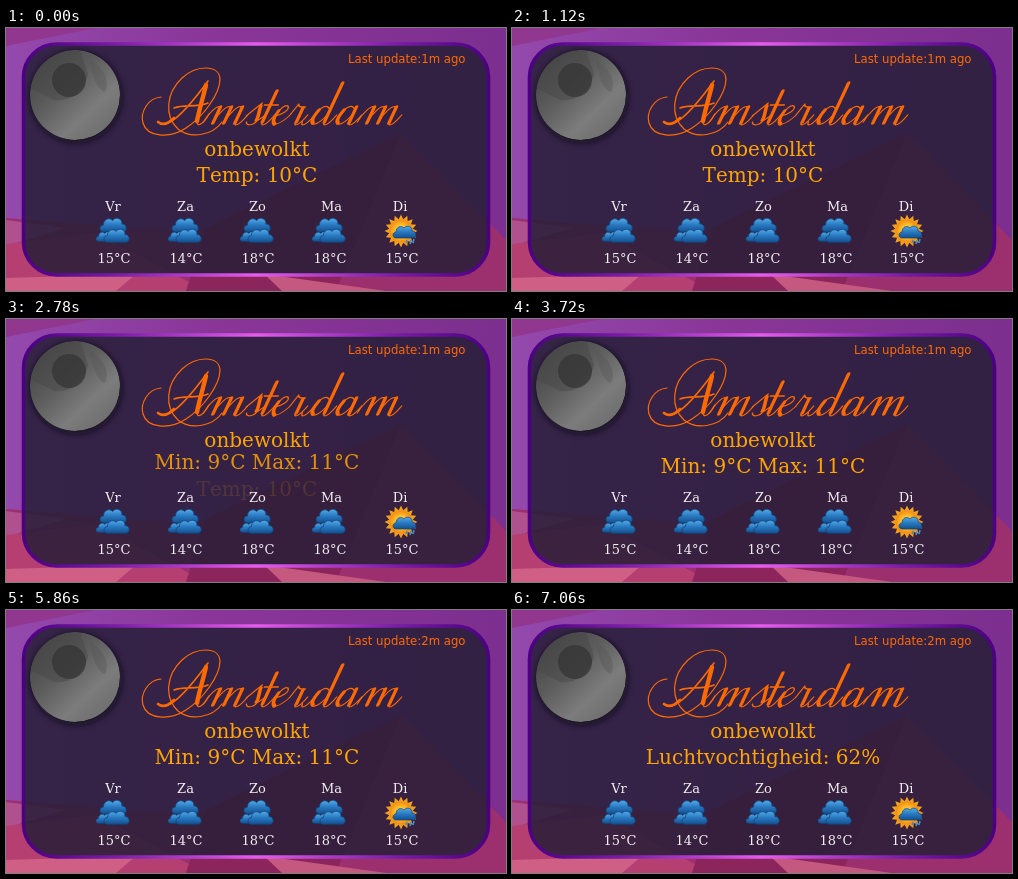
Animation of 500x263 px, one loop 8 s. Source, as an HTML page:

```html
<!DOCTYPE html>
<html lang="nl">
<head>
<meta charset="utf-8">
<title>Weer</title>
<style>
html, body { margin: 0; width: 100%; height: 100%; overflow: hidden; background: #6f3584; }
svg { display: block; width: 100vw; height: 100vh; }
text { font-family: "DejaVu Serif", serif; text-anchor: middle; font-kerning: none; }
.big { font-size: 20px; fill: #ffa500; }
.small { font-size: 13px; fill: #f4eef4; }
#update {
  font: 13px "DejaVu Sans Condensed", "DejaVu Sans", sans-serif;
  font-stretch: condensed; fill: #ff6a00; text-anchor: start;
}
.pen { fill: none; stroke: #ff6a00; stroke-linecap: round; stroke-linejoin: round; }
</style>
</head>
<body>
<svg viewBox="0 0 500 263" preserveAspectRatio="none">
  <defs>
    <linearGradient id="sky">
      <stop offset="0" stop-color="#9449ad"/><stop offset=".4" stop-color="#8a3699"/><stop offset="1" stop-color="#7c2f8e"/>
    </linearGradient>
    <linearGradient id="edge">
      <stop offset="0" stop-color="#4b0082"/><stop offset=".2" stop-color="#7a1da6"/>
      <stop offset=".5" stop-color="#e45cec"/>
      <stop offset=".8" stop-color="#7a1da6"/><stop offset="1" stop-color="#4b0082"/>
    </linearGradient>
    <linearGradient id="moonTone" x1=".15" y1=".1" x2=".85" y2=".85">
      <stop offset="0" stop-color="#464646"/><stop offset=".4" stop-color="#5e5e5e"/>
      <stop offset=".75" stop-color="#7c7c7c"/><stop offset="1" stop-color="#707070"/>
    </linearGradient>
    <linearGradient id="blue" x2="0" y2="1">
      <stop offset="0" stop-color="#55abe8"/><stop offset=".5" stop-color="#2878c0"/><stop offset="1" stop-color="#14508f"/>
    </linearGradient>
    <radialGradient id="sunTone">
      <stop offset="0" stop-color="#ffe36a"/><stop offset=".6" stop-color="#fdb827"/><stop offset="1" stop-color="#f28a12"/>
    </radialGradient>
    <filter id="soft" x="-30%" y="-30%" width="160%" height="160%"><feGaussianBlur stdDeviation="3"/></filter>
    <clipPath id="disc"><circle cx="69" cy="67" r="45"/></clipPath>
    <path id="puff" d="M3 13 C-1 13-1 7 3 7 C3 2 8 0 11 3 C14-1 20 2 19 6 C24 6 24 13 20 13 Z"
      fill="url(#blue)" stroke="#0f4479" stroke-width=".7"/>
    <g id="clouds">
      <use href="#puff" transform="translate(-13 -14) scale(1.15)"/>
      <use href="#puff" transform="translate(-17 0) scale(.8)"/>
      <use href="#puff" transform="translate(-9 -3) scale(1.1)"/>
    </g>
  </defs>

  <rect width="500" height="263" fill="url(#sky)"/>
  <path d="M0 0H90L0 18Z" fill="#92378f"/>
  <path d="M0 190L190 205 395 105 500 212V263H0Z" fill="#9c2f6e"/>
  <path d="M0 192L60 200 0 218Z" fill="#b0508f"/>
  <path d="M0 216L90 205 200 263H0Z" fill="#b63f72"/>
  <path d="M0 250L130 246 110 263H0Z" fill="#cf5f84"/>
  <path d="M180 263L200 200 395 105 330 263Z" fill="#8c255c"/>
  <path d="M258 246L380 263H276Z" fill="#c4587f"/>

  <rect x="17.5" y="16" width="465" height="231" rx="33" fill="#271f38" fill-opacity=".86"
    stroke="url(#edge)" stroke-width="3.6"/>

  <circle cx="70" cy="69" r="46" fill="#0c0912" opacity=".75" filter="url(#soft)"/>
  <g clip-path="url(#disc)">
    <circle cx="69" cy="67" r="45" fill="url(#moonTone)"/>
    <path d="M24 60C28 38 45 24 74 22L82 46C78 62 66 74 48 72Z" fill="#484848" opacity=".5"/>
    <circle cx="63" cy="52" r="17" fill="#343434" opacity=".75"/>
    <path d="M84 32C98 40 104 53 99 64C91 62 86 47 84 32Z" fill="#555" opacity=".4"/>
  </g>

  <text id="update" x="342" y="35"></text>

  <g class="pen" role="img" aria-label="Amsterdam">
    <path stroke-width="1.2" d="M155 69C142 70 134 84 137 95C141 109 163 111 180 100C197 89 214 66 214 51C213 36 190 37 176 50C160 65 158 88 172 101C184 111 206 108 216 94"/>
    <path stroke-width="1.6" d="M152 94C160 101 174 91 202 53M168 80C178 76 190 80 202 75"/>
    <path stroke-width="2.6" d="M152 94C157 98 163 95 168 90"/>
    <path stroke-width="4.4" d="M200 57C197 70 193 82 191 93"/>
    <path stroke-width="1.3" d="M191 94C191 99 197 97 203 86"/>
    <g transform="translate(0 97) skewX(-25)">
      <path id="thin" stroke-width="1.3"/>
      <path id="thick" stroke-width="3.5"/>
    </g>
  </g>

  <text class="big" x="251" y="128">onbewolkt</text>
  <text class="big" id="old" x="251"></text>
  <text class="big" id="new" x="251"></text>
  <g id="days"></g>
</svg>
<script>
const $ = id => document.getElementById(id);
const LOOP = 8000, SLIDE = 1000, LINE = 27;
const lines = ["Temp: 10°C", "Min: 9°C Max: 11°C", "Luchtvochtigheid: 62%"];
const starts = [1948, 5948];
// The widget repaints only at these moments.
const paints = [0, 2340, 2700, 3160, 4680, 6240, 6600, 7020];

// Script lettering, upright on the baseline; the group slants it.
const stem = x => `M${x} -18V-2`;
const arch = x => `M${x} -3C${x + 1} -12 ${x + 6} -20 ${x + 10} -18`;
const exit = x => `M${x} -3C${x} 2 ${x + 5} 1 ${x + 9} -10`;
const bowl = x => `M${x + 11} -17C${x + 5} -22 ${x} -14 ${x} -7C${x} 2 ${x + 7} 1 ${x + 12} -9`;
const bowlSide = x => `M${x + 2} -15C${x} -10 ${x - 1} -4 ${x + 2} -2`;
const emm = x => [arch(x - 10) + arch(x) + arch(x + 11) + exit(x + 22), stem(x) + stem(x + 11) + stem(x + 22)];
const letters = [
  emm(206),
  ["M236-9L246-22C244-18 248-12 249-7C250 0 241 2 239-3M249-4L255-10", "M246-19C246-14 249-10 248-5"],
  [exit(255) + "M249-20H263", "M255-34V-3"],
  ["M264-9C272-10 277-16 273-19C269-21 265-14 265-7C265 2 272 1 279-9", "M266-14C264-8 265-3 268-1"],
  ["M279-9L283-21C284-17 288-18 291-18" + exit(288), "M289-17V-3"],
  [exit(295) + bowl(304) + exit(317), bowlSide(304) + "M317-42V-3"],
  [bowl(329) + exit(342), bowlSide(329) + stem(342)],
  emm(360)
];
$("thin").setAttribute("d", letters.map(l => l[0]).join(""));
$("thick").setAttribute("d", letters.map(l => l[1]).join(""));

const sun = () => {
  const points = Array.from({ length: 32 }, (_, i) => {
    const a = i * Math.PI / 16, r = i % 2 ? 12 : 16.5;
    return `${(r * Math.cos(a)).toFixed(1)},${(r * Math.sin(a)).toFixed(1)}`;
  });
  return `<polygon points="${points.join(" ")}" fill="#f4a01c"/><circle r="11.5" fill="url(#sunTone)"/>
    <use href="#puff" x="-8" y="-6"/>
    <path d="M6 9l-1 3M10 9l-1 4M13 8l-1 4" stroke="#3f8fd0" stroke-width="1.6"/>`;
};

const days = [["Vr", 107, 15], ["Za", 179.5, 14], ["Zo", 251.5, 18], ["Ma", 325.5, 18], ["Di", 394, 15]];
$("days").innerHTML = days.map(([name, x, temp], i) => `
  <text class="small" x="${x}" y="183">${name}</text>
  <g transform="translate(${107 + 72 * i} 203)">${i < 4 ? '<use href="#clouds"/>' : sun()}</g>
  <text class="small" x="${108 + 72 * i}" y="235">${temp}°C</text>`).join("");

// Without a condensed face, use the matching smaller size.
$("update").textContent = "Last update:1m ago";
if ($("update").getComputedTextLength() > 123) $("update").style.fontSize = "11.6px";

const swing = p => (1 - Math.cos(Math.PI * Math.min(1, Math.max(0, p)))) / 2;

function place(el, text, y, opacity) {
  el.textContent = text;
  el.setAttribute("y", y);
  el.setAttribute("opacity", opacity);
}

function draw(time) {
  const t = paints.filter(p => p <= time).pop();
  const n = t < starts[1] ? 0 : 1;
  const p = swing((t - starts[n]) / SLIDE);
  place($("old"), lines[n], 154 + LINE * p, 1 - p);
  place($("new"), lines[n + 1], 154 + LINE * (p - 1), p);
  $("update").textContent = `Last update:${t < 4680 ? 1 : 2}m ago`;
}

const begin = performance.now();
function tick() {
  draw((performance.now() - begin) % LOOP);
  requestAnimationFrame(tick);
}
tick();
</script>
</body>
</html>
```
